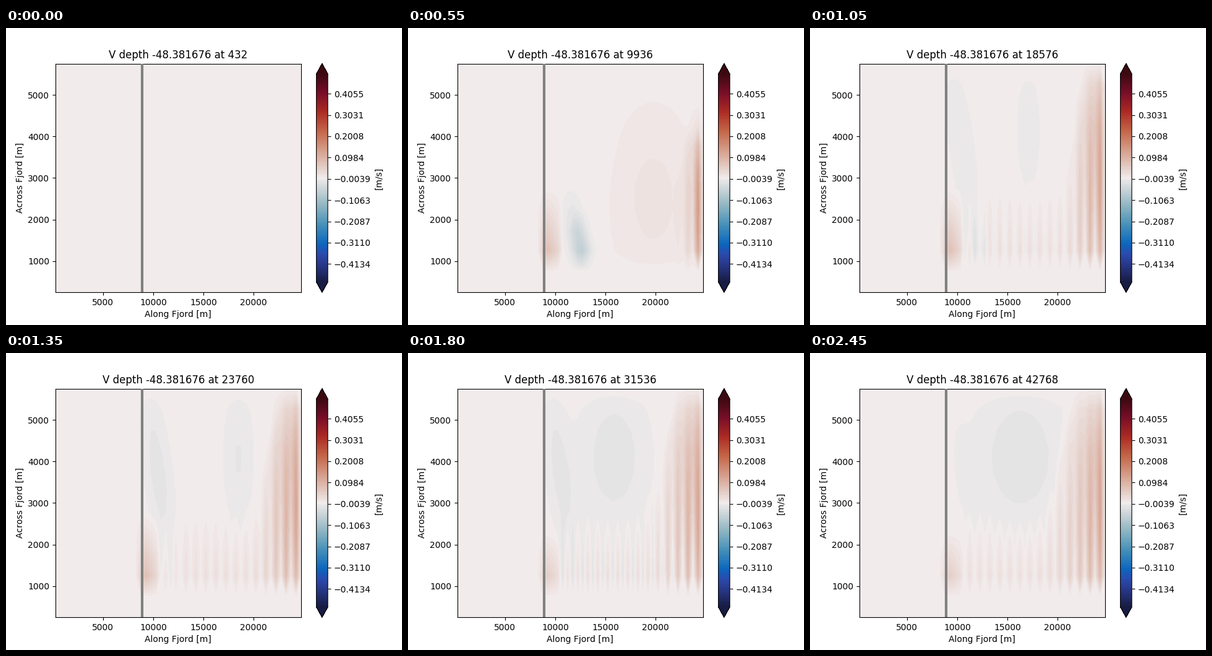
A matplotlib script for the animation above (2500 ms loop, 640 by 480 pixels).

```python
import numpy as np
import matplotlib.pyplot as plt
from matplotlib.animation import FuncAnimation
from matplotlib.colors import LinearSegmentedColormap

plt.rcParams["text.kerning_factor"] = 6

FRAMES, INTERVAL = 50, 50
STEP = 864  # model time between two frames

# Diverging map: dark blue, white, dark red
blues = ["#171c42", "#293a8f", "#0b66bd", "#4590b9", "#8eb5c2", "#d2d8db"]
reds = ["#e6d2cc", "#d59d89", "#c46548", "#ac2b24", "#780e28", "#3c0911"]
stops = np.linspace(0, 1, 12)
colours = list(zip(stops, blues + reds)) + [(1.5 / 11, "#294caf"), (0.5, "#f1ecec")]
balance = LinearSegmentedColormap.from_list("balance", sorted(colours), N=256)
levels = np.linspace(-0.5, 0.5, 128)

# 500 m grid: cell centres along and across the fjord
X, Y = np.meshgrid(np.arange(250, 25000, 500), np.arange(250, 6000, 500))
even = (X - 250) % 1000 == 0
wet = (X > 8500) & (X < 24500) & (Y > 1000) & (Y < 5500)


def smooth(t):
    t = np.clip(t, 0, 1)
    return t * t * (3 - 2 * t)


def pulse(i, peak, width):
    return np.exp(-((i - peak) / width) ** 2)


def wedge(top):
    """Falls from 1 at the sill (1250 m) to 0 at the given height."""
    return np.clip((top - Y) / (top - 1250), 0, 1)


def dome(top):
    """Rises from the south shore and returns to 0 at the given height."""
    return np.sin(np.pi * np.clip((Y - 250) / (top - 250), 0, 1)) ** 0.6


def eddy(cx, cy, width, height, tilt=0):
    dy = Y - cy
    return np.exp(-((X - cx - tilt * dy) / width) ** 2 - (dy / height) ** 2)


def wall(i, bell):
    """End wall current; its bands merge higher up."""
    dist = 24250 - X
    reach = 700 + 2000 * smooth((i - 9) / 18)
    full = 4300 + 1450 * smooth((i - 11) / 4)
    band = np.where(even, 1, 0.75 * np.clip((Y - 750) / 3500, 0, 1))
    strength = 0.12 + 0.08 * pulse(i, 15, 3)
    return strength * np.exp(-dist / reach) * bell * band * dome(2400 + (full - 2400) * bell)


def comb(i, bell):
    """Spikes one cell wide; every other one swings below zero."""
    swing = -0.02 * np.cos(np.pi * (i - 15) / 21) ** 2
    spikes = np.where(even, 0.022, swing) * wedge(2800 + 2000 * bell)
    return smooth((i - 11) / 4) * spikes * ((X > 10500) & (X < 24000))


def jet(i):
    """Northward flow just behind the section line."""
    early = smooth((36 - i) / 9)
    shape = np.interp(X, [8250, 9250, 10250, 10750], [0, 1, 0.5, 0])
    return (0.05 + 0.025 * early) * shape * wedge(2300 + 400 * early)


def eddies(i):
    late = max(0, i - 11)
    lee = -0.075 * np.exp(-late / 8) * eddy(12500 - 50 * late, 1350, 900, 700, -0.8)
    warm = 0.015 * pulse(i, 11, 5) * eddy(
        19800 - 3000 * smooth(late / 4), 2500, 3900, 2000)
    side = -0.018 * pulse(i, 31, 14) * eddy(10500, 3700, 1300, 1900, -0.5)
    cx = 16500 + 2000 * np.cos(2 * np.pi * (i - 27) / 30)
    centre = -0.0195 * smooth((i - 4) / 38) * eddy(
        cx, 4100, 1400 + 2700 * smooth((i - 26) / 16), 1600)
    return lee + warm + side + centre


def velocity(i):
    bell = np.exp(-((24250 - X) / (1400 + 70 * i)) ** 4)
    v = wall(i, bell) + comb(i, bell) + jet(i) + eddies(i)
    return np.where(wet, smooth(i / 11) * v, 0)


def contours(i):
    return ax.contourf(X, Y, velocity(i), levels, cmap=balance, extend="both")


fig, ax = plt.subplots(figsize=(6.4, 4.8), dpi=100)
field = contours(0)
ticks = levels[11::13]
bar = fig.colorbar(field, ax=ax, label="[m/s]")
bar.set_ticks(ticks, labels=[f"{t:.4f}".replace("-", "\u2212") for t in ticks])
bar.minorticks_off()

ax.axvline(8900, color="gray", lw=3, zorder=3)
ax.set_xlim(250, 24750)
ax.set_ylim(250, 5750)
ax.set_xlabel("Along Fjord [m]")
ax.set_ylabel("Across Fjord [m]")
title = ax.set_title("")


def update(i):
    global field
    field.remove()
    field = contours(i)
    title.set_text(f"V depth -48.381676 at {432 + STEP * i}")


anim = FuncAnimation(fig, update, frames=FRAMES, interval=INTERVAL,
                     init_func=lambda: None, repeat=True, repeat_delay=0)
plt.show()
```
